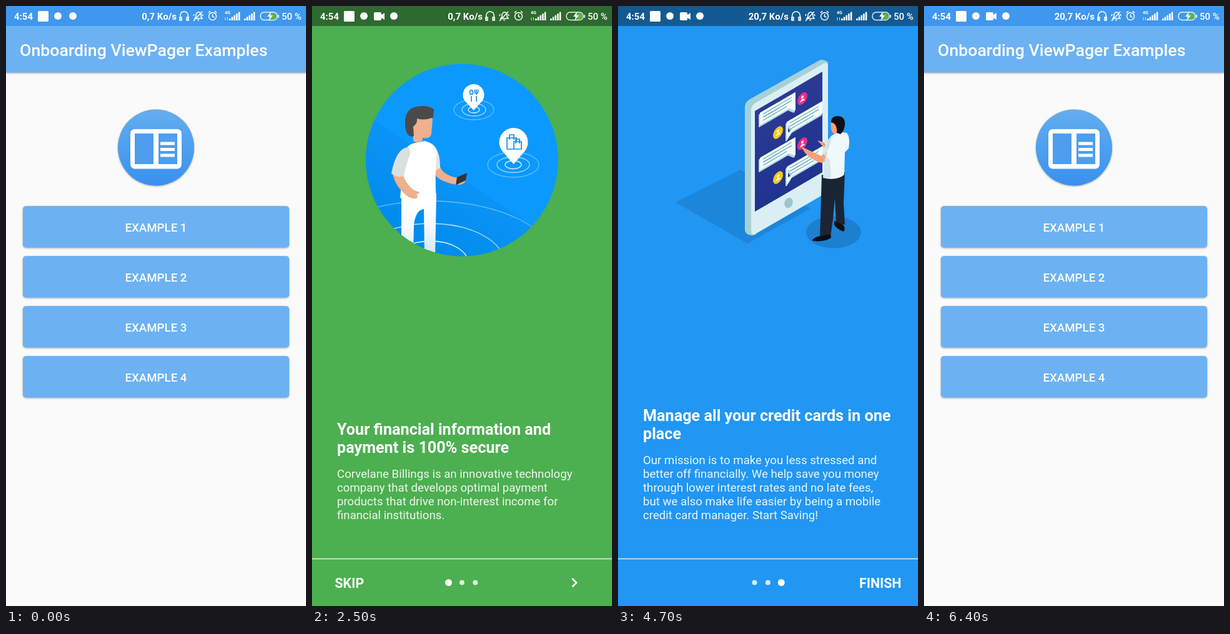
These frames come from a looping animation (480 by 960 pixels, 6.5 s). An HTML page:

```html
<!DOCTYPE html>
<html lang="en">
<head>
<meta charset="utf-8">
<title>Onboarding</title>
<style>
html, body { margin: 0; width: 100%; height: 100%; overflow: hidden; background: #fafafa; }
svg { display: block; font-family: Roboto, Arial, sans-serif; }
text { fill: #fff; }
.bar { font-size: 26.67px; font-weight: 500; }
.btn { font-size: 18.67px; font-weight: 500; text-anchor: middle; }
.title { font-size: 25.2px; font-weight: 700; }
.body { font-size: 18.67px; opacity: .9; }
.nav { font-size: 21.33px; font-weight: 700; }
.stat { font-size: 15px; font-weight: 700; }
.line { fill: none; stroke: #fff; }
.raised { filter: drop-shadow(0 1.5px 1.5px #0005); }
</style>
</head>
<body>
<svg id="stage" width="480" height="960" viewBox="0 0 480 960">
  <defs>
    <clipPath id="screen"><rect width="480" height="960"/></clipPath>
    <clipPath id="disc"><circle cx="240" cy="246.5" r="154"/></clipPath>
    <clipPath id="art"><rect x="80" y="80" width="320" height="320"/></clipPath>
    <clipPath id="key"><rect x="27" y="320" width="426" height="67" rx="5"/></clipPath>
    <linearGradient id="icon" x2="0" y2="1"><stop stop-color="#62aeef"/><stop offset="1" stop-color="#3a90ee"/></linearGradient>
    <linearGradient id="shade" gradientUnits="userSpaceOnUse" x1="225" y1="266" x2="160" y2="364"><stop stop-color="#0a94f7"/><stop offset="1" stop-color="#018cec"/></linearGradient>
    <linearGradient id="pants" gradientUnits="userSpaceOnUse" x1="0" y1="310" x2="0" y2="398"><stop stop-color="#fff"/><stop offset=".5" stop-color="#f6fafe"/><stop offset="1" stop-color="#cfe8fd"/></linearGradient>
    <linearGradient id="beam" gradientUnits="userSpaceOnUse" x1="354" y1="258" x2="300" y2="350"><stop stop-color="#fff" stop-opacity=".35"/><stop offset="1" stop-color="#fff" stop-opacity=".14"/></linearGradient>
    <linearGradient id="glass" x2="0" y2="1"><stop stop-color="#2b3a94"/><stop offset="1" stop-color="#20338f"/></linearGradient>
  </defs>

  <g id="home">
    <rect width="480" height="960" fill="#fafafa"/>
    <rect width="480" height="106.5" fill="#6cb2f3" class="raised"/>
    <rect width="480" height="32" fill="#3f97ee"/>
    <text x="22" y="80" class="bar">Onboarding ViewPager Examples</text>
    <circle cx="240" cy="226.5" r="61" fill="url(#icon)" class="raised"/>
    <rect x="199" y="197" width="82" height="63.5" rx="7" fill="#fff"/>
    <path d="M206 204h30v49h-30zM244 204h30v49h-30z" fill="#4e9eed"/>
    <path d="M247 220h23M247 229.5h23M247 239h23" class="line" stroke-width="5"/>
    <g id="keys"></g>
    <circle id="ripple" cx="240" cy="353" r="0" fill="#fff" clip-path="url(#key)"/>
  </g>
  <rect id="dim" width="480" height="960"/>

  <g id="activity" clip-path="url(#screen)">
    <g id="pages"></g>
    <rect width="480" height="32" opacity=".4"/>
    <rect id="press" x="360" y="885" width="120" height="75" opacity="0"/>
    <path d="M0 884.5H480" class="line" stroke-width="1.3" opacity=".85"/>
    <g id="dots"></g>
    <g id="next">
      <text x="36.5" y="930.5" class="nav">SKIP</text>
      <path d="M416.5 916l6.5 6.7-6.5 6.7" class="line" stroke-width="2.7"/>
    </g>
    <text id="finish" x="386" y="930.5" class="nav">FINISH</text>
  </g>

  <g id="status">
    <text x="13" y="21.5" class="stat">4:54</text>
    <rect x="51" y="8" width="17" height="17" rx="1.5" fill="#fff"/>
    <circle cx="83" cy="16" r="6" fill="#fff"/>
    <circle id="app" cy="16" r="6" fill="#fff"/>
    <path id="camera" d="M101 10h8q2 0 2 2v2l5-3v11l-5-3v2q0 2-2 2h-8q-2 0-2-2v-9q0-2 2-2z" fill="#fff"/>
    <text id="speed" x="273" y="21.5" class="stat" text-anchor="end"></text>
    <g class="line" stroke-width="1.5">
      <path d="M279 22q-2-13 6-13t6 13M278 18v5h3v-5zM289 18v5h3v-5z"/>
      <path d="M302 20l2-3v-3q1-4 4-4 4 0 4 5v2l2 3zM306 22.5h3M314 9L300 24M301 13l-1 3M314 13l1 3"/>
      <circle cx="330.5" cy="16.5" r="6"/>
      <path d="M330.5 13v4l3 1M324 11l3-3M337 11l-3-3"/>
      <rect x="407" y="10" width="27" height="12.5" rx="6" opacity=".9"/>
      <path d="M436 14v5"/>
    </g>
    <path d="M421 11.5h7q5 0 5 5t-5 5h-7z" fill="#59b548"/>
    <path d="M424 9l-6 8h4l-2 7 7-9h-4z" fill="#fff"/>
    <text x="350" y="12.5" font-size="7" font-weight="700">4G</text>
    <path d="M351 18v5M354.5 18v5" class="line" opacity=".8"/>
    <g id="bars" fill="#fff"></g>
    <text x="441" y="21.5" class="stat" style="font-weight:500">50 %</text>
  </g>
</svg>

<script>
const $ = id => document.getElementById(id);
const range = n => [...Array(n).keys()];
const clamp = u => Math.max(0, Math.min(1, u));
const easeOut = (u, power) => 1 - (1 - clamp(u)) ** power;
const smooth = u => (u = clamp(u), u * u * (3 - 2 * u));
const slide = u => 1 - (1 - clamp(u) ** 2) ** 3;
const set = (id, name, value) => $(id).setAttribute(name, value);
const move = (id, x, y = 0) => set(id, 'transform', `translate(${x} ${y})`);
const path = (fill, d) => `<path fill="${fill}" d="${d}"/>`;

const rings = (x, y, list) => list.map(([rx, ry, o]) =>
  `<ellipse class="line" cx="${x}" cy="${y}" rx="${rx}" ry="${ry}" opacity="${o}" stroke-width="1.3"/>`).join('');
const pinShape = (x, y, r, tip) =>
  path('#fff', `M${x} ${tip}L${x - r * .8} ${y + r * .6}A${r} ${r} 0 1 1 ${x + r * .8} ${y + r * .6}Z`);

const walker = `
  <circle cx="240" cy="246.5" r="154" fill="#0b99ff"/>
  <g clip-path="url(#disc)">
    ${path('url(#shade)', 'M70 163L370 363V420H70Z')}
    <g id="floor">${rings(190, 412, [[60, 36, 1], [118, 64, .7], [200, 100, .4]])}</g>
    <g id="man">
      ${path('url(#pants)', 'M143 300H199L197 400H180L179 325Q166 326 163 350L162 400H143Z')}
      <g id="arm">
        ${path('#eeb08e', 'M197 260L205 257Q209 269 228 274L240 275 246 279Q243 287 231 286 205 281 198 271Z')}
        <g id="phone">${path('#343434', 'M232 274L248 267 246 279 230 286.5Z')}</g>
      </g>
      ${path('#e3e3e3', 'M190 222Q205 226 205 259L198 263Z')}
      ${path('#fff', 'M161 220Q149 224 148 240L141 306Q148 317 172 316 194 315 199 308 196 275 200 232 196 219 180 216Z')}
      ${path('#eeb08e', 'M129 268L146 270Q149 283 162 294L172 298Q172 300 167 301 171 304 167 308 157 309 150 302 133 288 129 268Z')}
      ${path('#dcdfe0', 'M152 226Q134 230 127 268 137 276 147 272 150 255 157 237Q158 225 152 226Z')}
      ${path('#eeb08e', 'M162 190L167 177Q178 174 193 180L191 204Q190 213 177 211V215Q170 221 162 216Z')}
      ${path('#4a4a4a', 'M149 192Q147 164 168 161 184 158 195 165L194 178Q180 184 168 180 169 188 162 193L163 208Q151 212 149 192Z')}
    </g>
    <g id="pin0">
      ${rings(259, 166, [[9, 5, .9], [19, 10, .6], [32, 16, .35]])}${pinShape(258.5, 142, 17, 167)}
      <g fill="none" stroke="#0b8df0" stroke-width="1.6"><ellipse cx="255" cy="138" rx="2.5" ry="3.5"/>
      <path d="M255 144V153M263 144V153M260.5 133.500v5q2.500 3 5 0v-5M263 134v8"/></g>
    </g>
    <g id="pin1">
      ${rings(322, 254, [[13, 6.5, .9], [26, 12.5, .6], [41, 20, .35]])}${pinShape(322.5, 218, 23, 253)}
      <g fill="none" stroke="#0b8df0" stroke-width="1.7"><path d="M322 229H312V211H327V216M316 214V206H323V214M323 217H335V229H323ZM326 220V213H332V220"/></g>
    </g>
  </g>`;

const note = (x, y, s) => `<g transform="translate(${x} ${y}) scale(${s})">
  <ellipse rx="6" ry="4.5" fill="#d80000"/><path d="M5 0V-20Q8-13 13-12 15-8 12-4" fill="none" stroke="#d80000" stroke-width="2.5"/></g>`;
const eye = x => `<ellipse cx="${x}" cy="207.5" rx="11.5" ry="5" fill="#fff"/><circle cx="${x}" cy="207" r="5" fill="#2e7d4a"/>
  <circle cx="${x}" cy="207" r="2.3"/><path d="M${x - 12} 205q12-8 24 0" fill="none" stroke="#7a4a1c" stroke-width="1.7"/>
  <path d="M${x - 10} 196q11-4 20-1" fill="none" stroke="#a86a2c" stroke-width="2"/>
  <ellipse cx="${x * 1.6 - 144}" cy="229" rx="5" ry="8" fill="#f6ae70"/>`;

const desk = `<g clip-path="url(#art)">
  <g id="notes">${note(102, 213, 1)}${note(124, 205, .8)}${note(142.5, 212.5, .62)}</g>
  ${path('#c17c35', 'M179 280L181 200Q184 136 239 134 296 136 298 200V280Z')}
  ${path('#edb36b', 'M221 240H258V278H221Z')}
  ${path('#1cabc1', 'M190 280Q200 271 221 268 240 282 258 268 280 271 292 280Z')}
  ${path('#fdc579', 'M196 198Q245 182 268 154 275 175 283 185 286 235 262 255 240 271 217 255 195 232 196 198Z')}
  ${eye(219)}${eye(260)}
  <path d="M234 230q5 4 10 0" fill="none" stroke="#e3a45f" stroke-width="1.5"/>
  ${path('#c8242c', 'M226 241Q233 238 239.5 241 247 238 253 241 249 249 239.5 249 231 249 226 241Z')}
  <path d="M185.5 194V190A54.5 57 0 0 1 295 190V196" fill="none" stroke="#dd0000" stroke-width="5"/>
  <rect x="176" y="189" width="18" height="35" rx="5" fill="#dd0000"/>
  <rect x="285" y="192" width="18" height="35" rx="5" fill="#dd0000"/>
  ${path('url(#beam)', 'M335 236L373 280 332 373H312L318 279 272 272Z')}
  ${path('#e8c800', 'M335 235A29.5 29.5 0 0 1 373 280ZM369 233L386 222 394 231 379 244ZM400 333L392 363H400ZM369 373V365Q369 363 371 363H400V373Z')}
  <path d="M388 233Q398 244 404 262" fill="none" stroke="#e0c000" stroke-width="6"/>
  ${path('#a4a4a4', 'M162 282Q162 278 166 278H315Q319 278 318 282L312 373H169Z')}
  ${path('#858585', 'M162 281Q162 278 166 278H315Q319 278 318 281Z')}
  <circle cx="240" cy="328" r="10.5" fill="#d2d2d2"/>
  <rect x="80" y="373" width="320" height="10" fill="#75280a"/>
  ${path('#fff', 'M80 352H127V360H80ZM80 362H137V372H80Z')}
  <path d="M80 352.5H127M80 360H127" stroke="#4a9bd6"/>
  <path d="M80 361.5H137" stroke="#6b2304"/>
  ${path('#76a82a', 'M80 365H87V378L83.5 375 80 378Z')}
</g>`;

// Chat parts live on the tilted plane of the tablet's glass.
const bubble = i => {
  const x = i % 2 ? 52 : 9, y = (i % 2 ? 48 : 8.5) + 72 * (i >> 1);
  const tail = i % 2 ? 'v26l9-9' : 'm55 0v27l-9-9';
  const shape = `M${x} ${y}h55v18h-55zM${x} ${y}${tail}z`;
  const ax = i % 2 ? 37 : 76, ay = (i % 2 ? 56 : 24.5) + 72 * (i >> 1);
  return `<g id="bubble${i}"><path transform="translate(-1.5 2)" d="${shape}" fill="#b5d6e6" stroke="#b5d6e6" stroke-linejoin="round" stroke-width="3"/>
    <path d="${shape}" fill="#f4fbfd" stroke="#f4fbfd" stroke-linejoin="round" stroke-width="2"/>
    <path d="M${x + 4} ${y + 4}h46M${x + 4} ${y + 14}h38" stroke="#54b8a4" stroke-width="1.4"/>
    <path d="M${x + 4} ${y + 9}h46" stroke="#5a86c5" stroke-width="1.4"/>
    <ellipse cx="${ax}" cy="${ay}" rx="8" ry="9" fill="${i % 2 ? '#fbc81c' : '#ec2f8c'}"/>
    <circle cx="${ax}" cy="${ay - 2.5}" r="2" fill="#fff"/><path d="M${ax - 4} ${ay + 4}q4-7 8 0z" fill="#fff"/></g>`;
};

const tablet = `<g clip-path="url(#art)">
  <path id="shadow" d="M92 314L196 262 308 324 207 380Z" fill="#1c86db"/>
  <g id="tablet">
    ${path('#a5d0d8', 'M213 367Q203 365 203 358V162Q203 154 211 149L322 87Q328 84 336 90V150L220 366Z')}
    ${path('#d9eff4', 'M213 359V167Q213 159 220 155L329 92Q336 89 336 96V288Q336 297 328 302L221 364Q213 369 213 359Z')}
    <g transform="matrix(1 -.583 0 1 219 168)">
      <rect width="108" height="161" fill="url(#glass)"/>
      ${range(4).map(bubble).join('')}
    </g>
    <ellipse cx="273" cy="315" rx="6.5" ry="8.5" fill="#9cc5d3" transform="rotate(20 273 315)"/>
  </g>
  <ellipse cx="345" cy="362" rx="44" ry="25.5" fill="#1c7fd0"/>
  ${path('#1b2433', 'M345 270L363 266 361 315 363 350 349 347ZM326 270L350 275 344 340 340 369 323 372Z')}
  ${path('#0c0f16', 'M311 374Q316 369 324 368L340 365 341 371Q330 378 312 376ZM346 344L360 350Q365 356 361 361 350 357 346 350Z')}
  ${path('#f5a27a', 'M293 225L302 229 325 240 334 233 339 246 325 251Q311 247 300 236ZM319 215L329 218 333 222 330 227ZM341 184Q339 203 347 205V210L356 206V188Z')}
  ${path('#eff8fa', 'M341 208Q352 200 366 203 372 210 369 228L363 234 362 270Q350 280 328 275L331 249Z')}
  ${path('#d3e7ec', 'M341 208Q332 217 328 236L339 246 341 275 328 275 331 245Z')}
  ${path('#101014', 'M341 186Q341 176 352 176 364 177 363 190 362 200 356 205L350 203Q351 188 341 186Z')}
</g>`;

const pages = [
  { color: '#4caf50', art: walker,
    title: ['Your financial information and', 'payment is 100% secure'],
    body: ['Corvelane Billings is an innovative technology', 'company that develops optimal payment',
      'products that drive non-interest income for', 'financial institutions.'] },
  { color: '#f44336', art: desk,
    title: ['Security improved with face', 'recognition during all your', 'transactions'],
    body: ['The face recognition system is creating a', 'safer planet through face recognition security',
      'software for retailers, airports, law enforcement', 'and more.'] },
  { color: '#2196f3', art: tablet,
    title: ['Manage all your credit cards in one', 'place'],
    body: ['Our mission is to make you less stressed and', 'better off financially. We help save you money',
      'through lower interest rates and no late fees,', 'but we also make life easier by being a mobile',
      'credit card manager. Start Saving!'] }
];

// Stacks lines upwards so that the last one sits on the given baseline.
const lines = (list, cls, last, pitch) => list.map((s, i) =>
  `<text x="40" y="${last - (list.length - 1 - i) * pitch}" class="${cls}">${s}</text>`).join('');

$('pages').innerHTML = pages.map((p, i) => `<g id="page${i}"><rect width="480" height="960" fill="${p.color}"/>${p.art}
  ${lines(p.title, 'title', 803 - 22 * p.body.length, 29.5)}${lines(p.body, 'body', 821, 22)}</g>`).join('');
$('keys').innerHTML = range(4).map(i => `<rect x="27" y="${320 + 80 * i}" width="426" height="66.5" rx="5" fill="#6cb2f3" class="raised"/>
  <text x="240" y="${360.5 + 80 * i}" class="btn">EXAMPLE ${i + 1}</text>`).join('');
$('dots').innerHTML = range(3).map(i => `<circle id="dot${i}" cx="${218.5 + 21.4 * i}" cy="922.5" fill="#fff"/>`).join('');
$('bars').innerHTML = [357, 381].map(x => range(5).map(i =>
  `<rect x="${x + 3.7 * i}" y="${20 - 2.6 * i}" width="2.6" height="${3 + 2.6 * i}"/>`).join('')).join('');

const grow = (id, x, y, s) => set(id, 'transform', `translate(${x} ${y}) scale(${s}) translate(${-x} ${-y})`);

function draw(t) {
  // Opening and closing of the onboarding screen over the home screen
  const x = 480 * (1 - slide((t - 596) / 570) + slide((t - 5800) / 570));
  const cover = 1 - x / 480;
  move('activity', x);
  move('home', -120 * cover);
  set('dim', 'opacity', .48 * cover);
  set('ripple', 'r', 230 * easeOut((t - 200) / 300, 2));
  set('ripple', 'opacity', t < 200 ? 0 : .16 * (1 - clamp((t - 500) / 200)));
  set('press', 'opacity', t > 5600 ? .1 : 0);

  // Swipes and indicator
  const pos = easeOut((t - 2600) / 500, 3) + easeOut((t - 3700) / 500, 3);
  range(3).forEach(i => {
    const near = clamp(1 - Math.abs(pos - i));
    move('page' + i, 480 * (i - pos));
    set('dot' + i, 'r', 4 + 1.5 * near);
    set('dot' + i, 'opacity', .8 + .2 * near);
  });
  set('next', 'opacity', pos < 1.5 ? 1 : 0);
  set('finish', 'opacity', pos < 1.5 ? 0 : 1);

  // The walker straightens up, then rings and map pins appear
  const bend = 1 - smooth((t - 1150) / 750);
  set('man', 'transform', `translate(0 ${53 * bend}) rotate(${5.5 * bend} 170 335)`);
  set('arm', 'transform', `rotate(${27 * bend} 200 262)`);
  set('phone', 'transform', `rotate(${-32 * bend} 239 277)`);
  grow('floor', 190, 412, easeOut((t - 1400) / 600, 3));
  grow('pin0', 259, 167, easeOut((t - 1500) / 500, 3));
  grow('pin1', 322, 253, easeOut((t - 1700) / 500, 3));

  move('notes', 0, 3 * Math.sin((t - 3300) / 200));

  // Floating tablet and its chat
  const lift = 11 * Math.sin((t - 4700) / 800 * Math.PI);
  move('tablet', 0, lift);
  grow('shadow', 205, 322, 1 - lift * .0032);
  range(4).forEach(i => set('bubble' + i, 'opacity', t < 5100
    ? 1 - clamp((t - 4900) / 200)
    : clamp((t - 5230 - 300 * i) / 250)));

  set('app', 'cx', t < 500 ? 107 : 131);
  set('camera', 'opacity', t < 500 ? 0 : 1);
  $('speed').textContent = (t < 4200 ? '0,7' : '20,7') + ' Ko/s';
}

const start = performance.now();
(function frame() {
  draw((performance.now() - start) % 6500);
  requestAnimationFrame(frame);
})();
</script>
</body>
</html>
```
